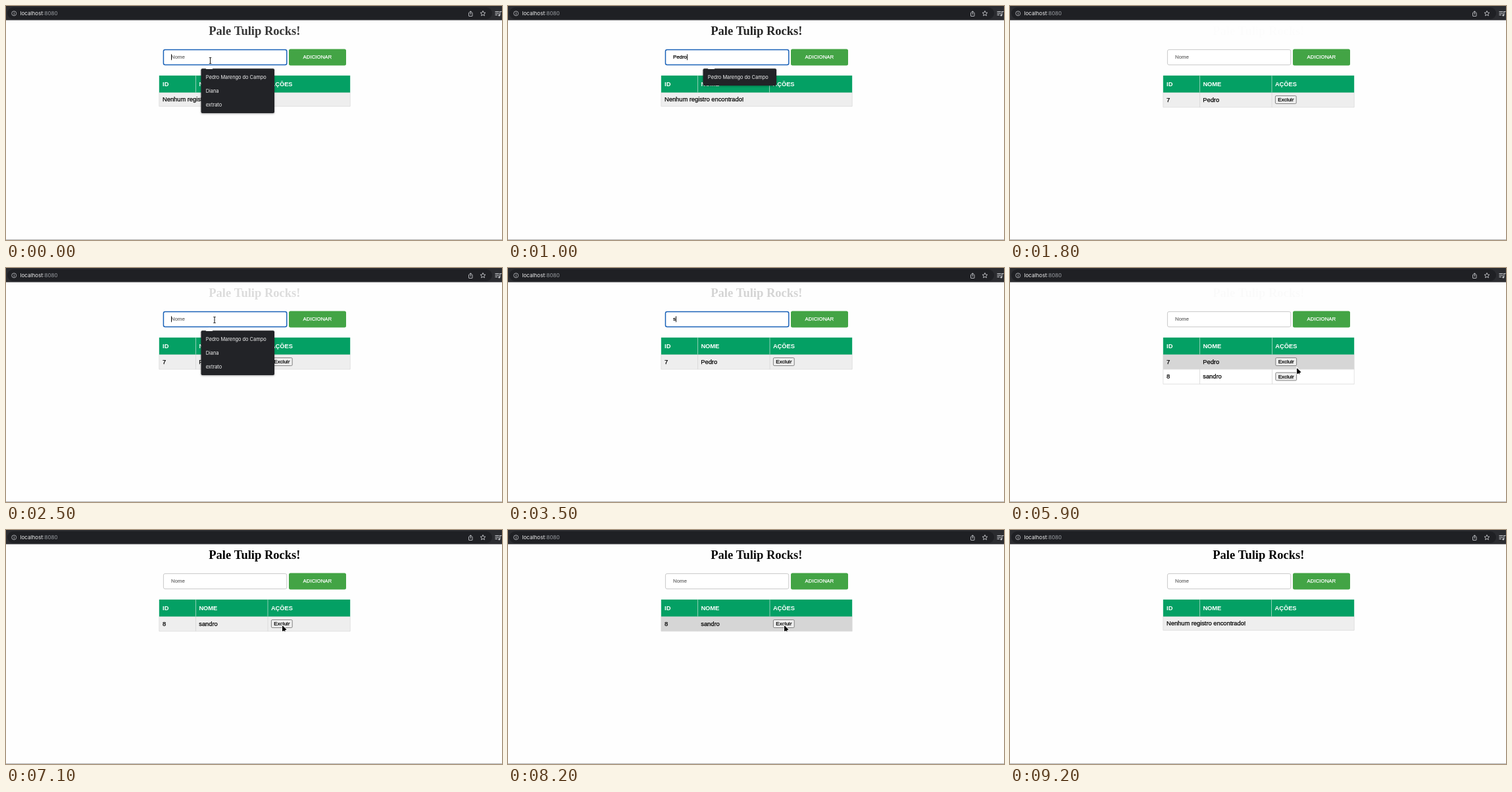
Recreate the animation shown at these times as an HTML page with a canvas. Size 754 px wide and 356 px high, loop 9300 ms.

```html
<!DOCTYPE html>
<html lang="pt-BR">
<head>
<meta charset="utf-8">
<title>Cadastro de nomes</title>
<style>
html, body { margin: 0; width: 754px; height: 356px; overflow: hidden; background: #fff; }
canvas { display: block; }
</style>
</head>
<body>
<canvas id="stage" width="754" height="356"></canvas>
<script>
const ctx = document.getElementById('stage').getContext('2d');
const LOOP = 9300, STEP = 100;
const SANS = '"Liberation Sans", Arial, sans-serif';
const SERIF = '"Liberation Serif", "Times New Roman", serif';
const UI = 'Inter, Roboto, sans-serif';
const FIRST = 'Pedro', SECOND = 'sandro';
const SUGGESTIONS = ['Pedro Marengo do Campo', 'Diana', 'extrato'];
const LEFT = 232.8, RIGHT = 523.2, HEAD = 105.8, BODY = 131.6, ROW = 22.5;

const between = (t, a, b) => t >= a && t < b;
const typed = (word, t, start, pace) => word.slice(0, Math.max(0, Math.floor((t - start) / pace)));

function text(str, x, y, font, color = '#000', align = 'left', weight = 0) {
  ctx.font = font;
  ctx.fillStyle = ctx.strokeStyle = color;
  ctx.textAlign = align;
  ctx.fillText(str, x, y);
  if (weight) {
    ctx.lineWidth = weight;
    ctx.strokeText(str, x, y);
  }
}

// Page text, slightly heavier than the font's regular weight.
const label = (str, x, y, size, color, align) => text(str, x, y, size + 'px ' + SANS, color, align, .25);

function rect(x, y, w, h, color) {
  ctx.fillStyle = color;
  ctx.fillRect(x, y, w, h);
}

function box(x, y, w, h, r, fill, stroke, line = 1) {
  ctx.beginPath();
  ctx.roundRect(x, y, w, h, r);
  if (fill) { ctx.fillStyle = fill; ctx.fill(); }
  if (stroke) { ctx.strokeStyle = stroke; ctx.lineWidth = line; ctx.stroke(); }
}

function dot(x, y, r, fill) {
  ctx.beginPath();
  ctx.arc(x, y, r, 0, 2 * Math.PI);
  if (fill) ctx.fill(); else ctx.stroke();
}

// The CSS "ease" curve: solve x(s) by bisection, return y(s).
function ease(x) {
  let lo = 0, hi = 1;
  const bezier = (s, a, b) => 3 * a * s * (1 - s) ** 2 + 3 * b * s * s * (1 - s) + s ** 3;
  for (let i = 0; i < 20; i++) {
    const mid = (lo + hi) / 2;
    if (bezier(mid, .25, .25) < x) lo = mid; else hi = mid;
  }
  return bezier(lo, .1, 1);
}

function drawToolbar() {
  const icon = '#c3c5c9', font = '8.1px ' + UI;
  rect(0, 0, 754, 21.6, '#2b2c30');
  box(2, 2, 737, 18, 9, '#1f2024');
  text('localhost', 21.5, 14, font, '#f1f1f2');
  text(':8080', 21.5 + ctx.measureText('localhost').width, 14, font, '#9da0a5');

  ctx.strokeStyle = icon;
  ctx.lineWidth = .8;
  dot(12.2, 11.3, 3.5);
  rect(11.8, 10.8, .9, 2.5, icon);
  rect(11.8, 9.2, .9, .9, icon);

  box(703.5, 10, 5.5, 5.5, .5, null, icon, .9);
  rect(705.1, 9, 2.3, 2, '#1f2024');
  rect(705.8, 7.5, .9, 5.5, icon);
  rect(704.8, 8.2, 2.9, .9, icon);

  ctx.beginPath();
  for (let i = 0; i < 10; i++) {
    const a = i * Math.PI / 5 - Math.PI / 2, r = i % 2 ? 1.9 : 4.1;
    ctx.lineTo(725 + r * Math.cos(a), 11.5 + r * Math.sin(a));
  }
  ctx.closePath();
  ctx.stroke();

  for (let i = 0; i < 3; i++) rect(743.5, 8 + i * 2.5, i < 2 ? 6 : 3.5, 1.1, icon);
  rect(750.5, 8, 3, 1.1, icon);
  rect(750.5, 8, 1, 6, icon);
  dot(749.8, 14, 1.5, true);
}

function drawTitle(t) {
  ctx.globalAlpha = 1 - ease((.165 + t * .0009628) % 1);
  text('Pale Tulip Rocks!', 377.8, 43.6, 'bold 18.5px ' + SERIF, '#000', 'center');
  ctx.globalAlpha = 1;
}

function drawForm(value, focused) {
  box(239.4, 66.4, 187.4, 23.2, 2.5, '#fff', focused ? '#1a62b8' : '#c9c9c9', focused ? 1.5 : 1);
  label(value || 'Nome', 251, 80.3, 7.85, value ? '#000' : '#757575');
  if (focused) rect(251 + (value ? ctx.measureText(value).width : 0), 73.3, .9, 9, '#000');
  box(430, 65.4, 87, 25.2, 2.5, '#43a445');
  label('ADICIONAR', 473.4, 80.2, 7.85, '#fff', 'center');
}

function drawRow([id, name], i, columns, hovered) {
  const y = BODY + i * ROW, [, second, third] = columns;
  box(LEFT, y, RIGHT - LEFT, ROW, 0, hovered ? '#d6d6d6' : i ? '#fff' : '#eee', '#d9d9d9', .7);
  for (const x of [second, third]) rect(x - .4, y, .8, ROW, '#d6d6d6');
  label(id, 238, y + 14.1, 9.3);
  label(name, second + 4.8, y + 14.1, 9.3);
  box(third + 5.4, y + 5, 31.8, 12, 1.5, '#efefef', '#767676', .9);
  label('Excluir', third + 21.3, y + 13.6, 8, '#000', 'center');
}

function drawTable(rows, hoverFirst) {
  const columns = [233.2, 288.5, 397.6 + rows.length * .4];
  if (rows.length) {
    rows.forEach((row, i) => drawRow(row, i, columns, hoverFirst && i === 0));
  } else {
    box(LEFT, BODY, RIGHT - LEFT, 21.1, 0, '#eee', '#d9d9d9', .7);
    label('Nenhum registro encontrado!', 238, 144.9, 9.3);
  }
  rect(LEFT, HEAD, RIGHT - LEFT, BODY - HEAD, '#04a064');
  ['ID', 'NOME', 'AÇÕES'].forEach((name, i) => {
    if (i) rect(columns[i] - .4, HEAD, .8, BODY - HEAD, '#b5dccb');
    text(name, columns[i] + 4.9, 122.4, 'bold 9.3px ' + SANS, '#fff');
  });
}

function drawPopup(items) {
  ctx.save();
  ctx.shadowColor = 'rgba(0,0,0,.35)';
  ctx.shadowBlur = 3;
  ctx.shadowOffsetY = 1;
  box(296.5, 95.3, 111.5, 4.7 + items.length * 21, 2, '#222327');
  ctx.restore();
  ctx.beginPath();
  ctx.moveTo(303.5, 96);
  ctx.lineTo(309, 90.3);
  ctx.lineTo(314.5, 96);
  ctx.fill();
  items.forEach((item, i) => text(item, 303.7, 110.8 + i * 21, '7.4px ' + UI, '#f2f2f2'));
}

function glide(t, start, end, from, to) {
  const u = Math.min(1, Math.max(0, (t - start) / (end - start)));
  return from.map((v, i) => v + (to[i] - v) * u * u * (3 - 2 * u));
}

// The pointer hides while typing.
function pointerAt(t) {
  const field = [324.5, 78.5], submit = [478, 78], rowEdge = [436.5, 153], remove = [420.5, 146];
  if (t <= 300) return [310.5, 83];
  if (between(t, 2100, 3400)) return glide(t, 2100, 2400, [330, 58], [317, 79]);
  if (between(t, 4400, 5300)) return glide(t, 4500, 4900, field, submit);
  if (between(t, 5300, 5900)) return glide(t, 5300, 5800, submit, rowEdge);
  if (between(t, 5900, 8400)) return glide(t, 5900, 6200, rowEdge, remove);
  if (between(t, 8400, 8900)) return glide(t, 8400, 8900, remove, [521, -14]);
  return null;
}

function drawPointer(x, y) {
  const overInput = between(x, 239, 427) && between(y, 66, 90);
  ctx.save();
  ctx.translate(x, y);
  if (overInput) {
    rect(-.5, -4.5, 1, 9, '#111');
    for (const end of [-4.8, 4]) rect(-1.8, end, 3.6, .8, '#111');
  } else {
    ctx.beginPath();
    ctx.lineTo(0, 0);
    ctx.lineTo(0, 7.6);
    ctx.lineTo(5.4, 5.4);
    ctx.closePath();
    ctx.moveTo(2, 5);
    ctx.lineTo(3.6, 8.5);
    for (const [color, width] of [['#fff', 2.2], ['#000', 1]]) {
      ctx.strokeStyle = color;
      ctx.lineWidth = width;
      ctx.stroke();
    }
    ctx.fillStyle = '#000';
    ctx.fill();
  }
  ctx.restore();
}

function render(t) {
  const value = t < 1400 ? typed(FIRST, t, 300, 100) : t < 5300 ? typed(SECOND, t, 3200, 210) : '';
  const focused = t < 1400 || between(t, 2400, 5200);
  const rows = [];
  if (between(t, 1500, 6500)) rows.push(['7', FIRST]);
  if (between(t, 5400, 8300)) rows.push(['8', SECOND]);

  rect(0, 0, 754, 356, '#fefefe');
  drawToolbar();
  drawTitle(t);
  drawForm(value, focused);
  drawTable(rows, between(t, 5700, 6500) || between(t, 7400, 8300));
  if (focused && !value) drawPopup(SUGGESTIONS);
  else if (t < 1300) drawPopup(SUGGESTIONS.slice(0, 1));
  const pointer = pointerAt(t);
  if (pointer) drawPointer(...pointer);
  rect(0, 355, 754, 1, '#b5b5b5');
}

const start = performance.now();
function tick() {
  const t = (performance.now() - start) % LOOP;
  render(Math.floor(t / STEP) * STEP);
  requestAnimationFrame(tick);
}
tick();
</script>
</body>
</html>
```
